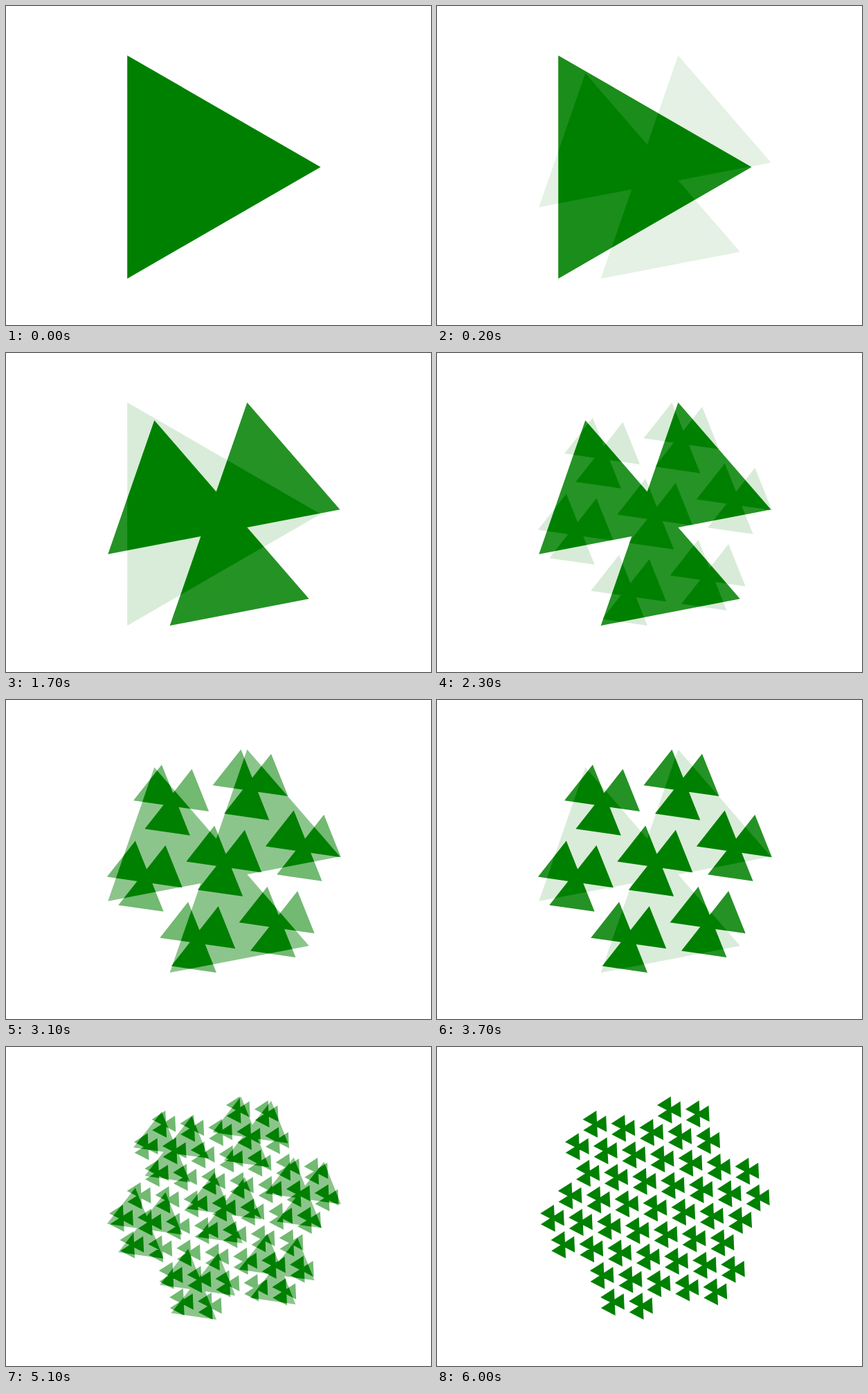
An HTML page for the animation above (8 s loop, 614 by 461 pixels).

```html
<!DOCTYPE html>
<html lang="en">
<head>
<meta charset="utf-8">
<title>Triangle flake</title>
<style>
  html, body { margin: 0; width: 100%; height: 100%; overflow: hidden; background: #fff; }
  svg { display: block; width: 614px; height: 461px; }
  path { fill: #008000; }
</style>
</head>
<body>
<svg viewBox="0 0 614 461">
  <rect width="614" height="461" fill="#fff"/>
  <path id="current"/>
  <g id="overlay" opacity="0">
    <rect width="614" height="461" fill="#fff"/>
    <path id="next"/>
  </g>
</svg>
<script>
const LOOP = 8000, STEP = 100, STEPS_PER_LEVEL = 20, LAST_LEVEL = 3;
const CENTER = [314.88, 232.7], HEIGHT = 322.56;
const TURN = Math.atan(Math.sqrt(3) / 5);
const RAD = Math.PI / 180;

const ring = (count, radius, angle) => Array.from({ length: count }, (_, i) => {
  const a = angle + i * 2 * Math.PI / count;
  return [radius * Math.cos(a), -radius * Math.sin(a)];
});
const spread = (points, offsets) =>
  points.flatMap(([x, y]) => offsets.map(([dx, dy]) => [x + dx, y + dy]));

// Each level sets seven smaller, turned clusters on a hexagonal lattice;
// the innermost cluster is three overlapping triangles.
function triangleCenters(level) {
  let centers = [[0, 0]];
  if (level === 0) return centers;
  for (let k = 1; k < level; k++) {
    const spacing = Math.sqrt(7) ** (level - k);
    centers = spread(centers, [[0, 0], ...ring(6, spacing, 30 * RAD - k * TURN)]);
  }
  return spread(centers, ring(3, 1 / Math.sqrt(3), 60 * RAD - level * TURN));
}

function levelPath(level) {
  const corners = ring(3, Math.sqrt(3) / 2, 120 * RAD - level * TURN);
  const points = spread(triangleCenters(level), corners);
  const range = axis => {
    const values = points.map(p => p[axis]);
    return [Math.min(...values), Math.max(...values)];
  };
  const ranges = [range(0), range(1)];
  const scale = HEIGHT / (ranges[1][1] - ranges[1][0]);
  const place = p => p.map((v, axis) =>
    (CENTER[axis] + scale * (v - (ranges[axis][0] + ranges[axis][1]) / 2)).toFixed(2));
  return points.map((p, i) =>
    (i % 3 ? 'L' : 'M') + place(p) + (i % 3 === 2 ? 'Z' : '')).join('');
}

const paths = Array.from({ length: LAST_LEVEL + 1 }, (_, level) => levelPath(level));
const [current, overlay, next] = ['current', 'overlay', 'next'].map(id => document.getElementById(id));
let shownLevel = -1;

function render(time) {
  let step = Math.min(Math.floor(time / STEP), LAST_LEVEL * STEPS_PER_LEVEL);
  if (step < 4) step -= step % 2; // the first steps are held twice as long
  const level = Math.floor(step / STEPS_PER_LEVEL);
  if (level !== shownLevel) {
    current.setAttribute('d', paths[level]);
    next.setAttribute('d', paths[Math.min(level + 1, LAST_LEVEL)]);
    shownLevel = level;
  }
  overlay.setAttribute('opacity', (step % STEPS_PER_LEVEL) / STEPS_PER_LEVEL);
}

let start;
function tick(now) {
  start ??= now;
  render((now - start) % LOOP);
  requestAnimationFrame(tick);
}
render(0);
requestAnimationFrame(tick);
</script>
</body>
</html>
```
